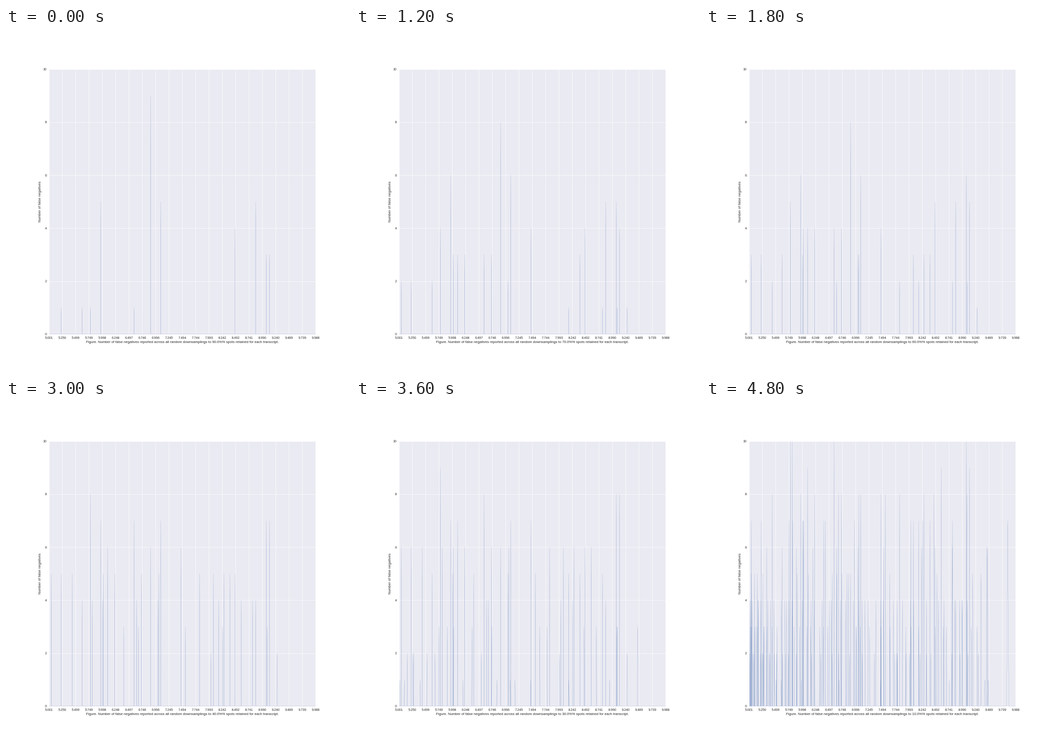
A matplotlib script that plays this animation: 748 px wide and 748 px high, repeating every 5.4 s.

```python
import numpy as np
import matplotlib.pyplot as plt
from matplotlib.animation import FuncAnimation

SIZE, DPI = 748, 50
LEFT, RIGHT = 0.125 * SIZE, 0.9 * SIZE
LOW, HIGH = 5.00072, 9.98792
STAGES = 9
LAST = STAGES - 1

plt.rcParams.update({
    "font.family": "Liberation Sans",
    "font.size": 10,
    "axes.labelsize": 11,
    "xtick.labelsize": 10,
    "ytick.labelsize": 10,
    "text.color": ".15",
    "axes.labelcolor": ".15",
    "xtick.color": ".15",
    "ytick.color": ".15",
})

rng = np.random.default_rng(8)

# A track is (position, first stage, height then, height at the last stage).
tracks = [
    (120, 0, 1, 7), (165.5, 0, 1, 6), (183.5, 0, 1, 12), (206, 0, 5, 8),
    (278.5, 0, 1, 10), (314.5, 0, 9, 5), (336.5, 0, 5, 8), (498, 0, 4, 6),
    (543, 0, 5, 4), (566, 0, 3, 10), (573, 0, 3, 9), (656, 7, 3, 7),
]


def add_rising(start, positions):
    """Transcripts that join early and grow tall, less so far right."""
    for k, x in enumerate(positions):
        tall = rng.uniform(6, 10) * np.clip((640 - x) / 140, 0, 1)
        tracks.append((x, start + k % 2, rng.integers(1, 4), tall))


def add_clutter(start, count, top, growth):
    """Late transcripts, crowded towards the left."""
    spread = (np.arange(count) + rng.random(count)) / count
    for x in LEFT + 2 + 525 * spread ** 1.5:
        first = rng.integers(1, top + 1)
        tracks.append((x, start, first, first + rng.uniform(0, growth)))


add_rising(1, [98.5, 211.5, 221, 236.5, 294.5, 330.5, 380.5, 462.5, 487,
               536, 568, 589.5])
add_rising(3, [144, 187.5, 210, 256, 284, 288, 332.5, 390, 421, 445.5, 451,
               471, 474, 511.5])
add_clutter(6, 28, 3, 5)
add_clutter(7, 45, 3, 4)
add_clutter(8, 70, 4, 0)


def height(track, i):
    _, start, first, last = track
    if i < start:
        return 0
    t = (i - start) / max(LAST - start, 1)
    return min(round(first + (last - first) * t), 10)


def outline(i):
    """Line that runs along zero and rises to each peak."""
    xs, ys = [LEFT], [0]
    for track in sorted(tracks):
        x, h = track[0], height(track, i)
        if h:
            half = 0.4 + 3 * ((x - LEFT) / (RIGHT - LEFT)) ** 12
            xs += [x - half, x, x + half]
            ys += [0, h, 0]
    xs, ys = np.array(xs + [RIGHT]), np.array(ys + [0])
    return LOW + (xs - LEFT) * (HIGH - LOW) / (RIGHT - LEFT), ys


fig = plt.figure(figsize=(SIZE / DPI, SIZE / DPI), dpi=DPI, facecolor="white")
ax = fig.add_axes([0.125, 0.11, 0.775, 0.77], facecolor="#EAEAF2")
ax.set_xlim(LOW, HIGH)
ax.set_ylim(0, 10)
ticks = np.linspace(LOW, HIGH, 21)
ax.set_xticks(ticks, [f"{t:.3f}" for t in ticks])
ax.set_yticks(range(0, 11, 2))
ax.tick_params(length=0, pad=7)
ax.grid(color="white", linewidth=1)
ax.set_axisbelow(True)
for spine in ax.spines.values():
    spine.set_visible(False)
ax.set_ylabel("Number of false negatives")
line, = ax.plot([], [], color="#4C72B0", linewidth=0.25)


def draw(i):
    line.set_data(*outline(i))
    ax.set_xlabel("Figure. Number of false negatives reported across all "
                  f"random downsamplings to {90 - 10 * i:.1f}%% spots "
                  "retained for each transcript.")
    return line, ax.xaxis.label


anim = FuncAnimation(fig, draw, frames=STAGES, interval=600,
                     repeat=True, repeat_delay=0, blit=False)
plt.show()
```
